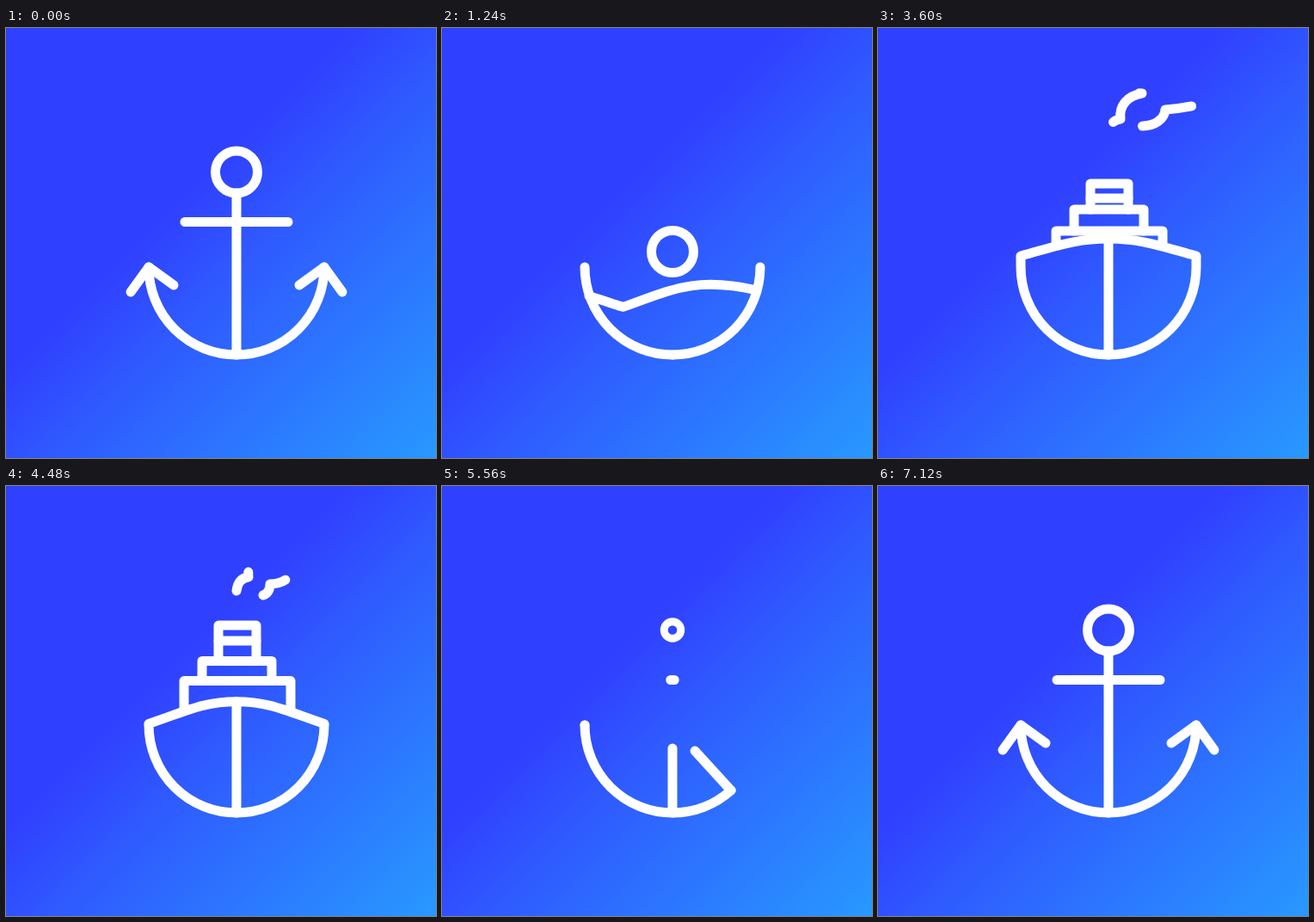
Recreate the animation shown at these times as an HTML page with a canvas. Size 500 by 500 pixels, loop 7.24 s.

```html
<!DOCTYPE html>
<html lang="en">
<head>
<meta charset="utf-8">
<title>Anchor and ship</title>
<style>
html, body { margin: 0; width: 100%; height: 100%; overflow: hidden; background: #3040ff; }
canvas { display: block; width: 500px; height: 500px; }
</style>
</head>
<body>
<canvas id="stage" width="500" height="500"></canvas>
<script>
const LOOP = 7240, CX = 268, CY = 278, R = 102;
const g = document.getElementById('stage').getContext('2d');

const sky = g.createLinearGradient(200, 200, 500, 500);
sky.addColorStop(0, '#3040ff');
sky.addColorStop(0.25, '#2f5aff');
sky.addColorStop(1, '#2899ff');

const clamp = (v, lo = 0, hi = 1) => Math.min(hi, Math.max(lo, v));
const mix = (a, b, k) => a + (b - a) * k;
const mixPoints = (a, b, k) => a.map((v, i) => mix(v, b[i], k));
const ramp = (t, from, to) => {
  const x = clamp((t - from) / (to - from));
  return x * x * (3 - 2 * x);
};
const back = (t, from, to) => {
  const x = clamp((t - from) / (to - from)) - 1;
  return 1 + 2.2 * x ** 3 + 1.2 * x ** 2;
};

// Water line and deck: two joined cubics each.
const puddle = [240, 374, 250, 374, 260, 374, 268, 374, 276, 374, 286, 374, 296, 374];
const water = [171, 312, 184, 316, 197, 321, 210, 325, 260, 308, 290, 288, 365, 305];
const hook = [295, 309, 302, 317, 309, 324, 316, 332, 323, 340, 330, 347, 337, 355];
const deck = bob => {
  const side = 277 - 12 * bob, top = 251 - 6 * bob, slope = 262 - 9 * bob;
  return [166, side, 210, slope, 230, top, 268, top, 306, top, 326, slope, 370, side];
};

const smoke = [
  'M268 122Q270 107 282 106C280 90 290 79 307 76C250 70 270 40 333 44',
  'M299 127Q307 124 307 114C322 114 333 106 334 95C428 88 448 42 368 42'
].map(d => {
  const el = document.createElementNS('http://www.w3.org/2000/svg', 'path');
  el.setAttribute('d', d);
  return { path: new Path2D(d), length: el.getTotalLength() };
});

function line(...p) {
  g.beginPath();
  for (let i = 0; i < p.length; i += 2) g.lineTo(p[i], p[i + 1]);
  g.stroke();
}

function traceDeck(p) {
  g.lineTo(p[0], p[1]);
  g.bezierCurveTo(...p.slice(2, 8));
  g.bezierCurveTo(...p.slice(8));
}

function drawRing(t) {
  let y = 167.5, size = 1;
  if (t < 1400) {
    y = t < 780
      ? 41 + 126.5 * (1 - clamp((t - 300) / 480)) ** 2
      : 41 + 218 * ((t - 780) / 460) ** 2;
    size = 1 - ramp(t, 1250, 1380);
  } else size = ramp(t, 5440, 5720);
  const r = 24.5 * size;
  if (r < 0.5) return;
  g.lineWidth = Math.min(11, 5 + r * 0.4);
  g.beginPath();
  g.arc(CX, y, r, 0, Math.PI * 2);
  g.stroke();
  g.lineWidth = 11;
}

function drawStem(t, bob) {
  const anchor = 1 - ramp(t, 100, 500) + ramp(t, 5440, 5720);
  const ship = ramp(t, 1600, 1900) - ramp(t, 5250, 5440);
  line(CX, 380, CX, 380 - 188 * anchor - (129 + 6 * bob) * ship);
  const half = 60 * (1 - ramp(t, 60, 420) + ramp(t, 5530, 5800));
  if (half > 0.1) line(CX - half, 225.5, CX + half, 225.5);
}

function drawBowl(t, bob) {
  const turn = 0.84 * (ramp(t, 5300, 5550) - ramp(t, 5570, 5900));
  const shown = t < 5300 ? 1 : 1 - ramp(t, 5300, 5450);
  const lift = 12 * bob * shown;
  g.beginPath();
  g.moveTo(CX - R, CY - lift);
  g.arc(CX, CY, R, Math.PI, turn, true);
  if (lift) g.lineTo(CX + R * Math.cos(turn), CY + R * Math.sin(turn) - lift);
  g.stroke();
  return turn;
}

function drawArrows(t, turn) {
  let size;
  if (t < 1200) size = t < 780 ? 1 + 0.8 * ramp(t, 40, 780) : 1.8 * (1 - ramp(t, 780, 1180));
  else if (t >= 5560) {
    const x = Math.max(0, (t - 5600) / 1000);
    size = 1 - Math.exp(-9 * x) * Math.cos(14 * x);
  } else return;
  const x = CX + R * Math.cos(turn), y = CY + R * Math.sin(turn);
  const folding = t >= 5560;
  const inX = folding ? mix(-42, -29, size) : -29 * size;
  const inY = folding ? mix(-46, 21, size) : 21 * size;
  line(x + inX, y + inY, x, y, x + 21 * size, y + 29 * size);
  line(166 - 21 * size, CY + 29 * size, 166, CY, 166 + 29 * size, CY + 21 * size);
}

function drawCabins(t, bob, edge) {
  const rise = back(t, 1600, 2150) * (1 - ramp(t, 5200, 5450));
  if (t < 1600 || rise < 0.01) return;
  const y = v => mix(262, v, rise);
  const low = y(226 + 10 * bob), mid = y(203 + 8 * bob);
  const top = y(161 + 20 * bob), stripe = y(179 + 19 * bob);
  g.save();
  g.beginPath();
  g.moveTo(0, 0);
  g.lineTo(0, edge[1]);
  traceDeck(edge);
  g.lineTo(500, edge[13]);
  g.lineTo(500, 0);
  g.clip();
  line(207, 270, 207, low, 331, low, 331, 270);
  line(228, low, 228, mid, 309, mid, 309, low);
  line(247, mid, 247, top, 291, top, 291, mid);
  line(247, stripe, 291, stripe);
  g.restore();
}

function drawSmoke(t) {
  if (t < 2170 || t > 5600) return;
  const age = t - 2170 - 1120 * Math.min(2, Math.floor((t - 2170) / 1120));
  const head = Math.min(1, 0.1 + 0.00098 * age);
  const tail = clamp((age - 240) / 880, 0, 0.999);
  for (const { path, length } of smoke) {
    g.setLineDash([Math.max(0.1, length * (head - tail)), 999]);
    g.lineDashOffset = -length * tail;
    g.stroke(path);
  }
  g.setLineDash([]);
}

function draw(t) {
  g.fillStyle = sky;
  g.fillRect(0, 0, 500, 500);
  g.strokeStyle = '#fff';
  g.lineWidth = 11;
  g.lineCap = g.lineJoin = 'round';

  const bob = t < 2200 || t > 5560 ? 0 : (1 - Math.cos((t - 2200) / 280 * Math.PI)) / 2;
  const turn = drawBowl(t, bob);
  if (t > 860 && t < 5560) {
    let edge = t < 1240
      ? mixPoints(puddle, water, ramp(t, 860, 1240))
      : mixPoints(water, deck(bob), back(t, 1240, 1720));
    edge = mixPoints(edge, hook, ramp(t, 5300, 5550));
    drawCabins(t, bob, edge);
    g.beginPath();
    traceDeck(edge);
    g.stroke();
  }
  drawStem(t, bob);
  drawArrows(t, turn);
  drawRing(t);
  drawSmoke(t);
}

const start = performance.now();
function tick() {
  draw((performance.now() - start) % LOOP);
  requestAnimationFrame(tick);
}
tick();
</script>
</body>
</html>
```
